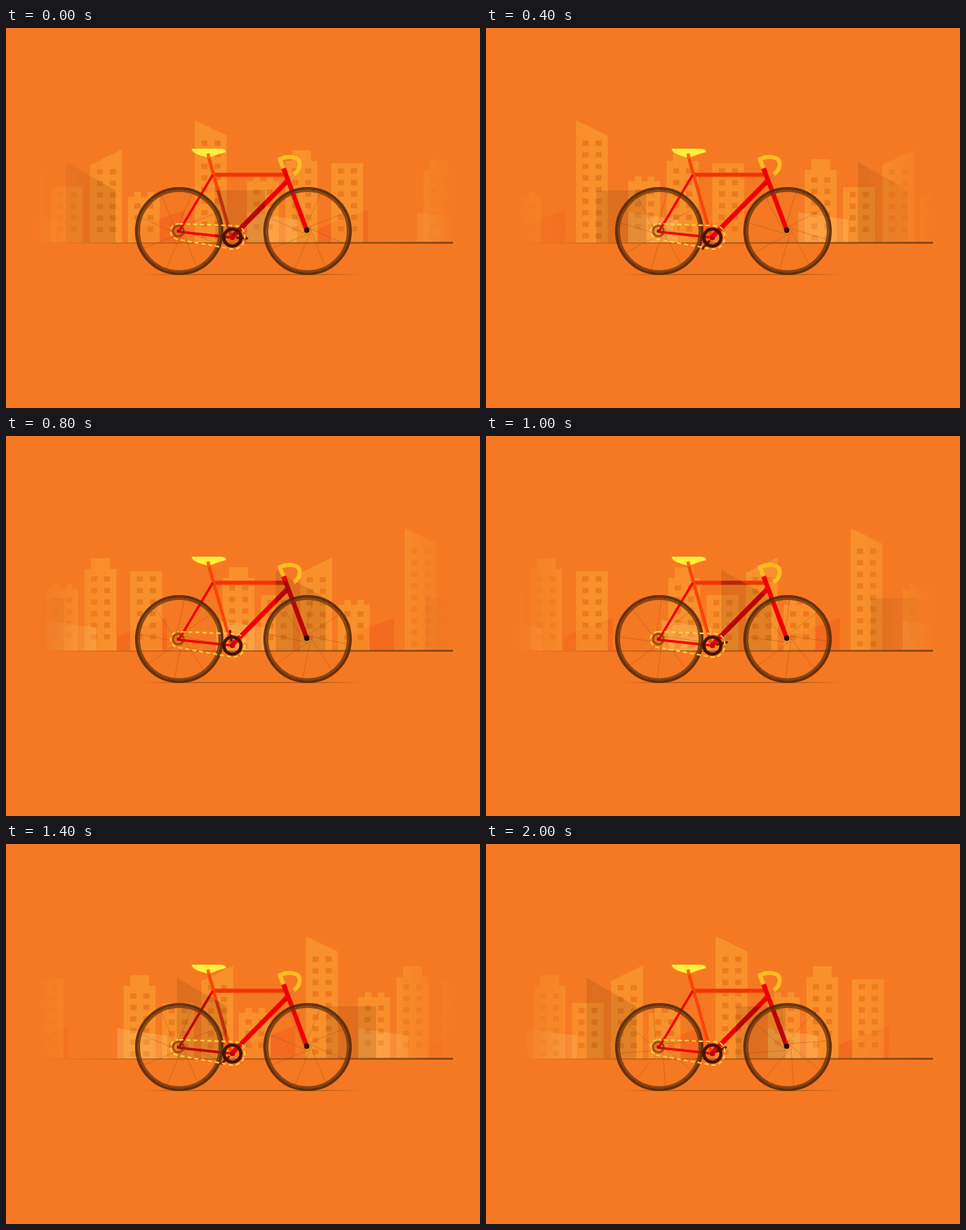
An HTML page with a canvas that plays this animation: 580 px wide and 466 px high, repeating every 2.2 s.

```html
<!DOCTYPE html>
<html lang="en">
<head>
<meta charset="utf-8">
<title>City bicycle</title>
<style>
  html, body { margin: 0; width: 100%; height: 100%; overflow: hidden; background: #f57923; }
  canvas { display: block; }
</style>
</head>
<body>
<canvas id="stage" width="580" height="466"></canvas>
<script>
const ctx = document.getElementById('stage').getContext('2d');
const TAU = Math.PI * 2, GROUND = 263, STEP = 200, SPAN = 503;

// Per step: distance the city has moved, and crank angle in degrees.
const travel = [0, 60, 121, 181.5, 246, 288, 330, 367, 404, 428, 453];
const crank = [3, 67, 131, 200, 261, 347, 434, 497, 560, 627, 695];

const WHEELS = [[212, 249], [369, 249]];
const BRACKET = [277, 257];

function fade(rgb, alpha, left, right, inset) {
  const g = ctx.createLinearGradient(left, 0, right, 0);
  const edge = inset / (right - left);
  [[0, 0], [edge, alpha], [1 - edge, alpha], [1, 0]]
    .forEach(([at, a]) => g.addColorStop(at, `rgba(${rgb},${a})`));
  return g;
}
const cityFade = (rgb, alpha) => fade(rgb, alpha, 38, 546, 85);

const LIGHT = cityFade('255,186,58', 0.36);
const WINDOW = cityFade('228,108,22', 0.62);
const DARK = cityFade('150,78,18', 0.24);
const PALE = cityFade('255,205,125', 0.28);
const REDDISH = cityFade('240,70,20', 0.28);
const SHADOW = fade('100,50,10', 0.55, 163, 440, 60);
const ROAD = ctx.createLinearGradient(40, 0, 547, 0);
ROAD.addColorStop(0, 'rgba(125,65,15,0)');
ROAD.addColorStop(0.25, 'rgba(125,65,15,.5)');
ROAD.addColorStop(1, 'rgba(115,62,15,.95)');

// Towers: x, first window row, outline relative to x.
const box = top => [[0, top], [39, top]];
const tiered = top => [[0, top], [0, top + 13], [8, top + 13], [8, top], [31, top], [31, top + 13], [39, top + 13]].slice(1);
const castle = top => [[0, top], [8, top], [8, top - 6], [16, top - 6], [16, top],
  [24, top], [24, top - 6], [32, top - 6], [32, top], [39, top]];
const towers = [
  [231, 138, [[0, 113], [39, 132]]],
  [398, 172, box(166)],
  [342, 172, tiered(150)],
  [511, 183, tiered(161)],
  [295, 198, castle(188)],
  [149, 215, castle(207)],
  [103, 173, [[0, 168], [39, 149]]],
  [55, 201, box(195)]
];

// Low blocks: x, left top, right top, paint; all 61 wide.
const pales = [[295, 226, 235], [0, 226, 235]];
const reds = [[382, 246, 223], [157, 246, 223]];
const darks = [[73, 164, 199], [256, 199, 199]];

function polygon(points, path = new Path2D()) {
  points.forEach(([x, y], i) => i ? path.lineTo(x, y) : path.moveTo(x, y));
  path.closePath();
  return path;
}

function screenX(x, shift) {
  return ((x - shift + 70) % SPAN + SPAN) % SPAN - 70;
}

// Calls draw for each copy of a piece that may be on the stage.
function copies(x, shift, draw) {
  const first = screenX(x, shift);
  draw(first);
  if (first < 50) draw(first + SPAN);
}

function blockPath(blocks, shift) {
  const path = new Path2D();
  for (const [x, a, b] of blocks)
    copies(x, shift, left => polygon(
      [[left, a], [left + 61, b], [left + 61, GROUND], [left, GROUND]], path));
  return path;
}

function drawTower(left, firstRow, outline) {
  const top = outline.map(([x, y]) => [left + x, y]);
  ctx.fillStyle = LIGHT;
  ctx.fill(polygon([...top, [left + 39, GROUND], [left, GROUND]]));
  ctx.fillStyle = WINDOW;
  for (let y = firstRow; y < 254; y += 14.2)
    for (const x of [8, 24]) ctx.fillRect(left + x, y, 7.5, 6.5);
}

function drawCity(shift, darkPath) {
  ctx.fillStyle = REDDISH;
  ctx.fill(blockPath(reds, shift));
  for (const [x, row, outline] of towers)
    copies(x, shift, left => drawTower(left, row, outline));
  ctx.fillStyle = PALE;
  ctx.fill(blockPath(pales, shift));
  ctx.fillStyle = DARK;
  ctx.fill(darkPath);
}

function line(x1, y1, x2, y2, color, width) {
  ctx.strokeStyle = color;
  ctx.lineWidth = width;
  ctx.beginPath();
  ctx.moveTo(x1, y1);
  ctx.lineTo(x2, y2);
  ctx.stroke();
}

function ring([x, y], radius, color, width) {
  ctx.strokeStyle = color;
  ctx.lineWidth = width;
  ctx.beginPath();
  ctx.arc(x, y, radius, 0, TAU);
  ctx.stroke();
}

function disc(x, y, radius, color) {
  ctx.fillStyle = color;
  ctx.beginPath();
  ctx.arc(x, y, radius, 0, TAU);
  ctx.fill();
}

function curve(d, color, width) {
  ctx.strokeStyle = color;
  ctx.lineWidth = width;
  ctx.stroke(new Path2D(d));
}

function drawGround() {
  ctx.fillStyle = ROAD;
  ctx.fill(polygon([[40, 263.6], [547, 262.2], [547, 264.4], [40, 264.2]]));
  ctx.fillStyle = SHADOW;
  ctx.fillRect(163, 301.8, 277, 1);
}

function drawFrame(tint) {
  const paint = color => tint || color;
  line(253, 180, 343, 180, paint('#f23405'), 5);
  line(247, 155, 275, 254, paint('#fa4508'), 4);
  line(212, 249, 253, 180, paint('#ef0503'), 3);
  line(212, 250, 277, 257, paint('#ef0000'), 3);
  line(277, 256, 345, 187, paint('#ef0000'), 6);
  line(340, 173, 368, 248, paint('#ef0000'), 5.5);
}

function drawWheel([x, y], angle) {
  for (let i = 0; i < 8; i++) {
    const a = angle + i * TAU / 8;
    line(x + 4 * Math.sin(a), y - 4 * Math.cos(a),
      x + 48 * Math.cos(a), y + 48 * Math.sin(a), 'rgba(115,60,15,.3)', 0.8);
  }
  ring([x, y], 52.3, 'rgba(82,38,8,.88)', 3.6);
  ring([x, y], 49.3, 'rgba(112,56,12,.8)', 2.6);
}

function drawBike(degrees, darkPath) {
  const angle = degrees * TAU / 360;
  ctx.lineCap = 'butt';
  drawFrame();
  ctx.save();
  ctx.clip(darkPath);
  drawFrame('rgba(95,15,20,.38)');
  ctx.restore();

  for (const wheel of WHEELS) drawWheel(wheel, angle - 74 * TAU / 360);

  ring([211, 249], 6.5, 'rgba(135,55,12,.75)', 2.5);
  disc(211, 249, 2.2, '#a51505');
  disc(368, 248, 3.2, '#280804');

  ctx.lineCap = 'round';
  const [bx, by] = BRACKET;
  line(bx + 6 * Math.cos(angle), by + 6 * Math.sin(angle),
    bx + 18 * Math.cos(angle), by + 18 * Math.sin(angle), '#741508', 3);
  ring(BRACKET, 10.5, '#4b1005', 4);
  disc(bx, by, 3.2, '#c50505');

  ctx.lineCap = 'butt';
  ctx.setLineDash([5, 3.6]);
  ctx.lineDashOffset = -angle * 14;
  curve('M211 240 L281 242.5 C289 243 293 250 292 258 C291 267 284 272 276 271 L209 259 C198 256 199 240 211 240Z', '#ffd43c', 1.8);
  ctx.setLineDash([]);

  ctx.fillStyle = '#fff03a';
  ctx.fill(new Path2D('M227 148 L262 148 Q269 148 269.5 152 Q261 154 252 158 Q247 160 240 157 Q228 154 227 148Z'));
  line(247, 154, 248.5, 160, '#f96512', 4);
  curve('M340 173 L335 161 C344 156 360 157 359.5 167 C359 173 356 177 352 179', '#ffbd24', 5);
  line(339.5, 172, 342, 178, '#ef0000', 5.5);
}

function draw(now) {
  const step = Math.floor(now / STEP) % travel.length;
  const darkPath = blockPath(darks, travel[step]);
  ctx.fillStyle = '#f57923';
  ctx.fillRect(0, 0, 580, 466);
  drawCity(travel[step], darkPath);
  drawGround();
  drawBike(crank[step], darkPath);
}

const start = performance.now();
function tick() {
  draw(performance.now() - start);
  requestAnimationFrame(tick);
}
tick();
</script>
</body>
</html>
```
